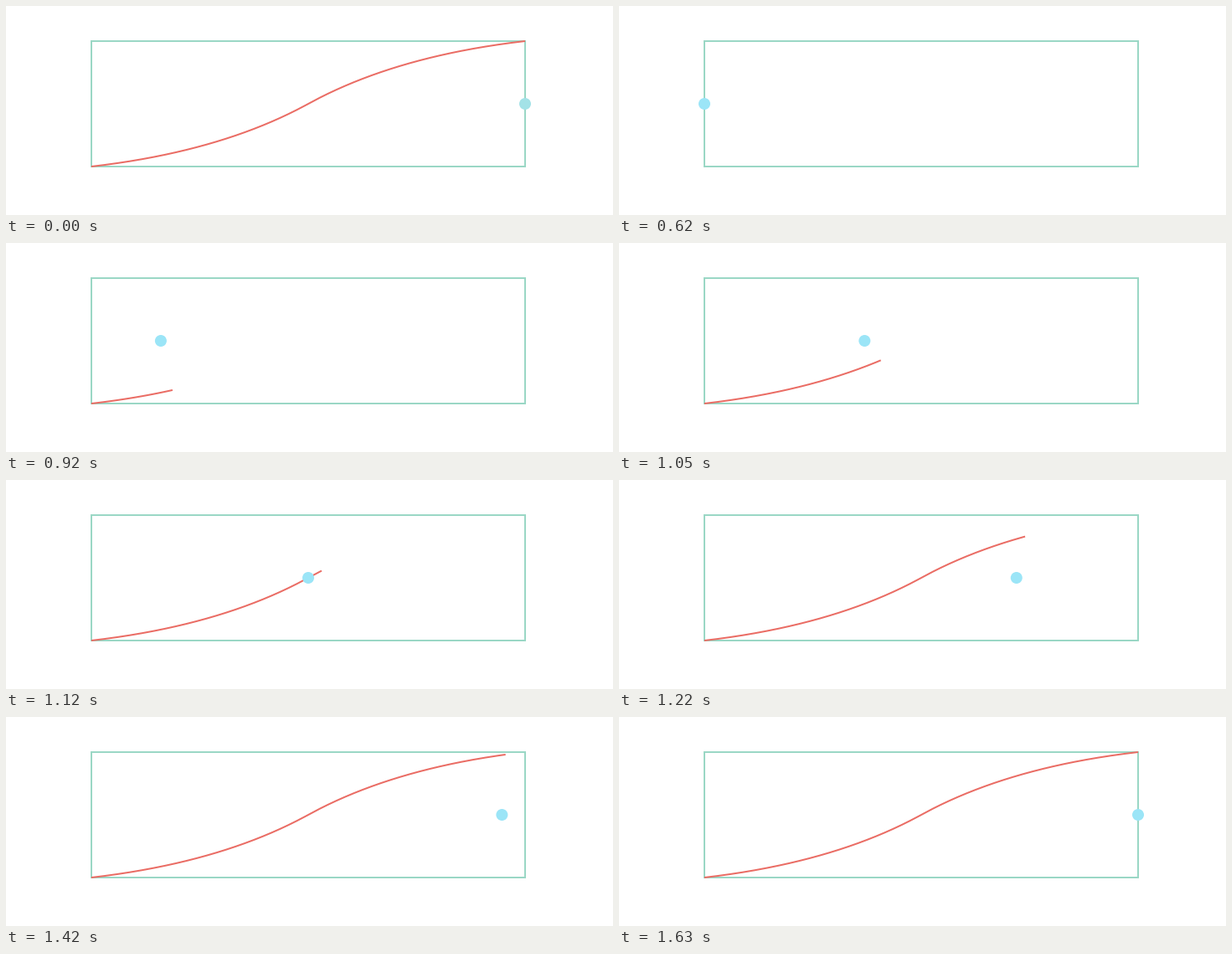
Animation, 725 px wide and 250 px high, one loop 1970 ms. Source, as a matplotlib script:

```python
import numpy as np
import matplotlib.pyplot as plt
from matplotlib.animation import FuncAnimation
from matplotlib.patches import Circle, Rectangle

W, H, DPI = 725, 250, 100
LEFT, TOP, RIGHT, BOTTOM = 102, 42, 620, 192
LOOP_MS, STEP_MS = 1970, 10
START_MS, UPDATE_MS = 620, 25
TICKS = 60          # the motion lasts 60 ticks, 1 second
STROKE = 2 * 72 / DPI

GREEN = "#9ad7c5"
RED = "#ea6c64"
BLUE = "#9be5f7"
BLUE_REST = "#a3e2e7"


def ease(t):
    """cubic-bezier(.5, 0, .5, 1)"""
    s = np.linspace(0, 1, 1001)
    return np.interp(t, 1.5 * s * (1 - s) + s**3, 3 * s**2 - 2 * s**3)


def s_curve(n=200):
    """Two mirrored quadratic Bezier halves and their arc length fractions."""
    t = np.linspace(0, 1, n)
    x = 310 * t - 51 * t**2
    y = 35.6 * t + 39.4 * t**2
    xs = np.concatenate([LEFT + x, (RIGHT - x)[-2::-1]])
    ys = np.concatenate([BOTTOM - y, (TOP + y)[-2::-1]])
    arc = np.concatenate([[0], np.cumsum(np.hypot(np.diff(xs), np.diff(ys)))])
    return xs, ys, arc / arc[-1]


fig = plt.figure(figsize=(W / DPI, H / DPI), dpi=DPI, facecolor="white")
ax = fig.add_axes([0, 0, 1, 1])
ax.set_xlim(0, W)
ax.set_ylim(H, 0)
ax.axis("off")

ax.add_patch(Rectangle((LEFT, TOP), RIGHT - LEFT, BOTTOM - TOP, fill=False,
                       ec=GREEN, lw=STROKE, joinstyle="miter", snap=False, zorder=1))
line, = ax.plot([], [], color=RED, lw=STROKE, solid_capstyle="butt",
                solid_joinstyle="round", snap=False, zorder=2)
dot = ax.add_patch(Circle((LEFT, (TOP + BOTTOM) / 2), 7, fc=BLUE, lw=0, zorder=3))

xs, ys, arc = s_curve()


def draw(frame):
    ms = frame * STEP_MS
    resting = ms < START_MS
    # Screen updates come every 25 ms; the dot trails the line by one tick.
    tick = 99 if resting else round(1.57 * ((ms - START_MS) // UPDATE_MS))
    tip = ease(min(tick, TICKS) / TICKS)
    pos = ease(min(max(tick - 1, 0), TICKS) / TICKS)

    if tip > 0:
        k = np.searchsorted(arc, tip)
        line.set_data(np.append(xs[:k], np.interp(tip, arc, xs)),
                      np.append(ys[:k], np.interp(tip, arc, ys)))
    else:
        line.set_data([], [])
    dot.center = (LEFT + (RIGHT - LEFT) * pos, (TOP + BOTTOM) / 2)
    dot.set_facecolor(BLUE_REST if resting else BLUE)
    return line, dot


anim = FuncAnimation(fig, draw, frames=LOOP_MS // STEP_MS, interval=STEP_MS,
                     repeat=True, repeat_delay=0, blit=False)
plt.show()
```
